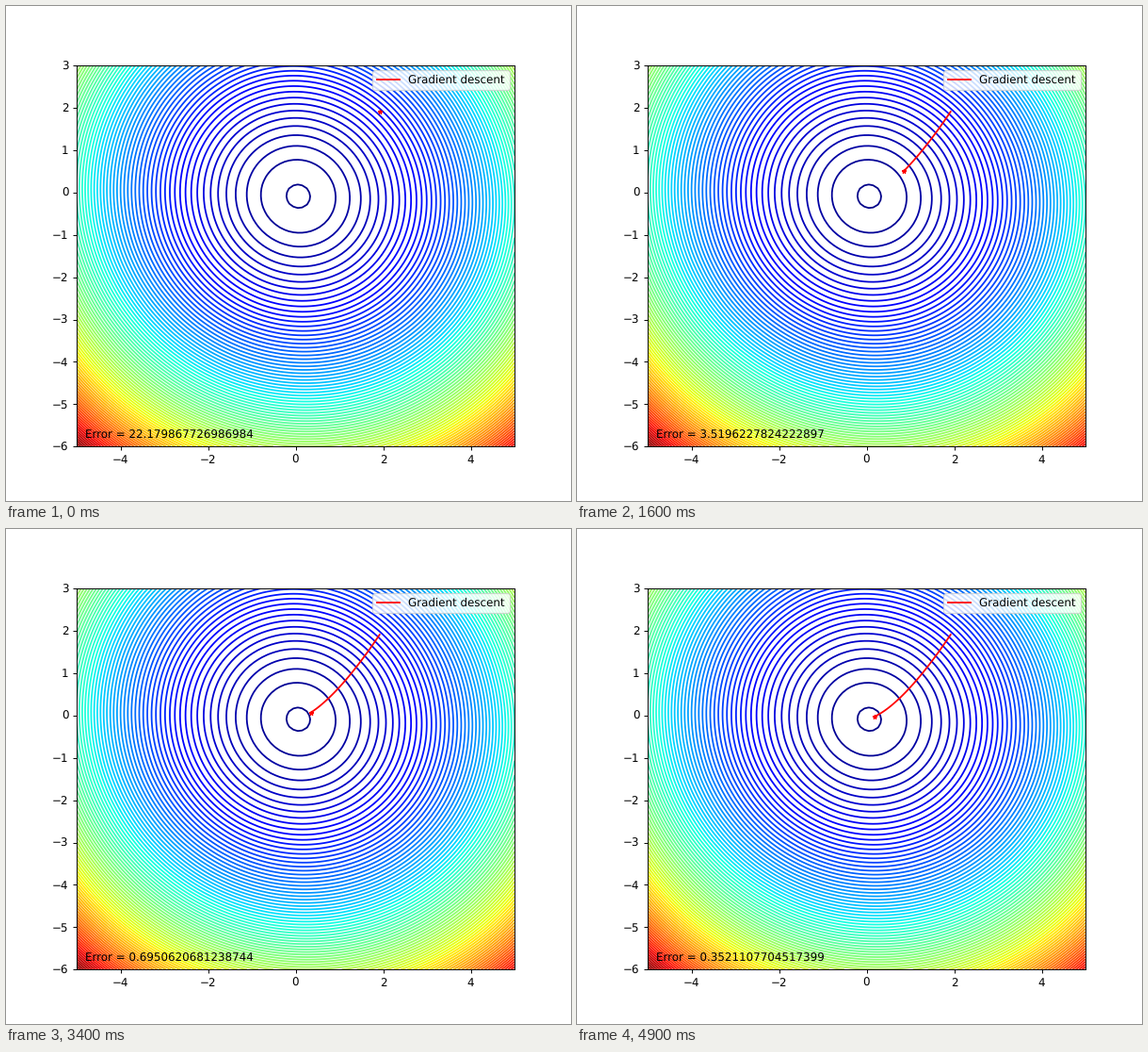
A matplotlib script for the animation above (5 s loop, 600x525 px).

```python
import numpy as np
import matplotlib.pyplot as plt
from matplotlib.animation import FuncAnimation

FRAMES, INTERVAL = 50, 100
START_ERROR, FINAL_ERROR = 22.179867726986984, 0.27

plt.rcParams["text.hinting"] = "none"


def cost(x, y):
    """Slightly tilted quadratic bowl, in units of the contour spacing."""
    u, v = x - 0.062, y + 0.09
    return u**2 / 0.6553 + v**2 / 0.6685 + 0.11 * u * v


# Each coordinate decays geometrically; the error follows their squares.
steps = np.arange(FRAMES)
decay_x, decay_y = np.exp(-0.0533 * steps), np.exp(-0.0783 * steps)
path_x = 0.04 + 1.88 * decay_x
path_y = -0.07 + 1.979 * decay_y
errors = FINAL_ERROR + (START_ERROR - FINAL_ERROR) * (2 * decay_x**2 + decay_y**2) / 3

fig, ax = plt.subplots(figsize=(7, 6.125), dpi=600 / 7)
fig.subplots_adjust(left=0.125, right=0.9, bottom=0.11, top=0.88)

grid_x, grid_y = np.meshgrid(np.linspace(-5, 5, 100), np.linspace(-6, 3, 100))
ax.contour(grid_x, grid_y, cost(grid_x, grid_y),
           levels=np.arange(97) - 0.885, cmap="jet")
ax.set(xlim=(-5, 5), ylim=(-6, 3))

line, = ax.plot([], [], "r", lw=1.5, label="Gradient descent")
star, = ax.plot([], [], "*", color="red", markersize=4)
error_text = ax.text(0.02, 0.02, "", transform=ax.transAxes)
ax.legend(loc="upper right", borderaxespad=0.44)


def update(step):
    line.set_data(path_x[:step], path_y[:step])
    star.set_data([path_x[step]], [path_y[step]])
    error_text.set_text(f"Error = {errors[step]}")
    return line, star, error_text


anim = FuncAnimation(fig, update, frames=FRAMES, interval=INTERVAL,
                     repeat=True, repeat_delay=0)
plt.show()
```
